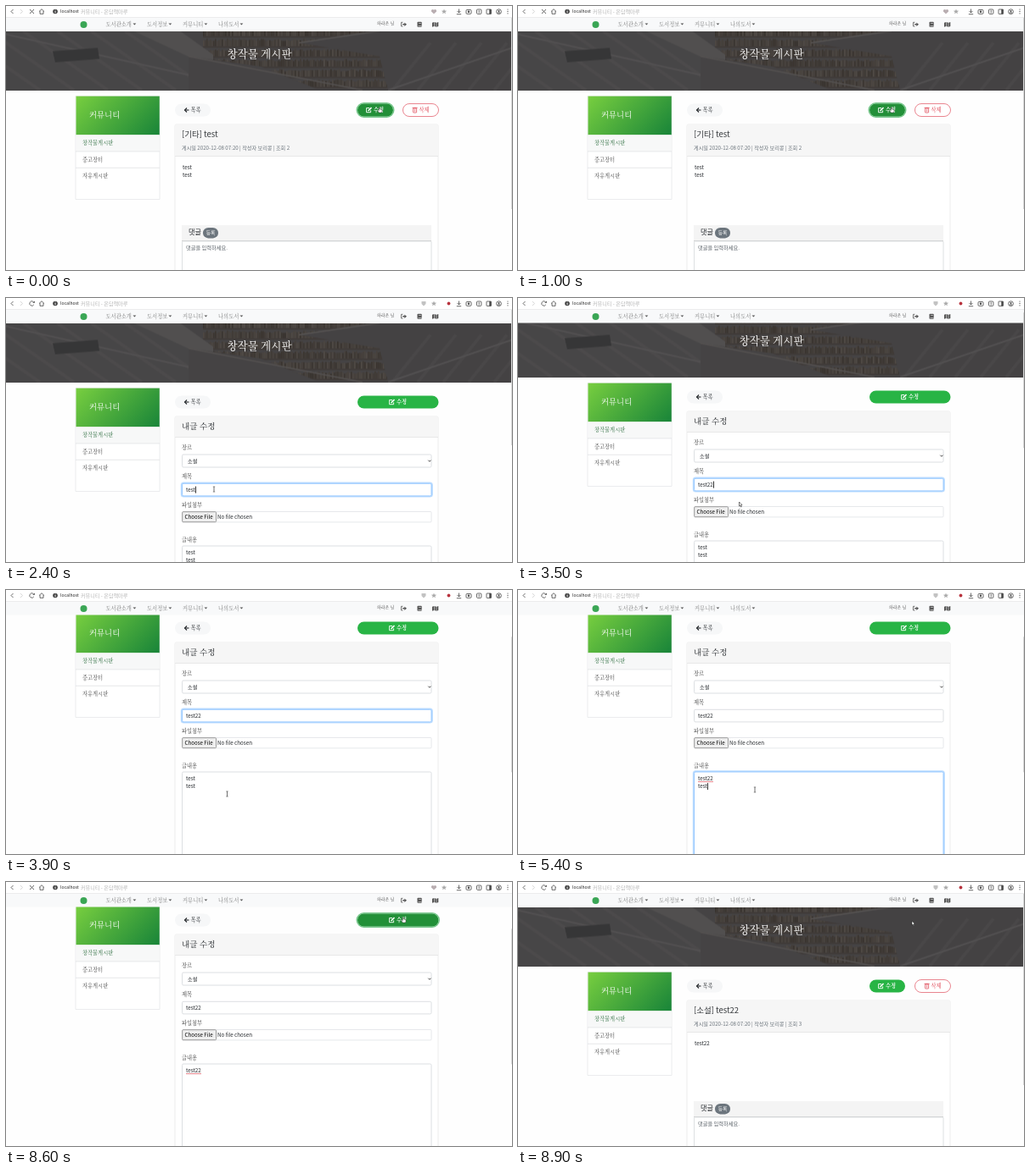
An HTML page with a canvas for the animation above (9000 ms loop, 596x312 px).

```html
<!DOCTYPE html>
<html lang="ko">
<head>
<meta charset="utf-8">
<title>게시판</title>
<style>
html, body { margin: 0; width: 100%; height: 100%; overflow: hidden; background: #fff; }
canvas { display: block; width: 596px; height: 312px; }
</style>
</head>
<body>
<canvas id="stage" width="596" height="312"></canvas>
<script>
const W = 596, H = 312, LOOP = 9000;
const SERIF = '"Noto Serif CJK KR", "Noto Serif KR", "Noto Sans CJK KR", serif';
const SANS = '"Noto Sans CJK KR", "Noto Sans CJK JP", "Noto Sans CJK", sans-serif';
const INK = '#212529', MUTED = '#6c757d', GREEN = '#28b445', DARK_GREEN = '#229038', RED = '#dc3545';
const EDIT_AT = 1100, CLICK_AT = 7500, DONE_AT = 8700;

const stage = document.getElementById('stage').getContext('2d');
let c = stage;

// y is the visual middle of the glyphs
function text(s, x, y, size, color = INK, font = SANS, weight = 400, align = 'left') {
  c.font = `${weight} ${size}px ${font}`;
  c.textAlign = align;
  c.fillStyle = color;
  c.fillText(s, x, y + size * 0.37);
}

function rect(x, y, w, h, color) {
  c.fillStyle = color;
  c.fillRect(x, y, w, h);
}

function box(x, y, w, h, r, fill, stroke, lw = 1) {
  c.beginPath();
  c.roundRect(x, y, w, h, r);
  if (fill) { c.fillStyle = fill; c.fill(); }
  if (stroke) { c.strokeStyle = stroke; c.lineWidth = lw; c.stroke(); }
}

function trace(points) {
  c.beginPath();
  for (let i = 0; i < points.length; i += 2) c.lineTo(points[i], points[i + 1]);
}

function line(points, color, lw = 0.8) {
  trace(points);
  c.strokeStyle = color;
  c.lineWidth = lw;
  c.stroke();
}

function poly(points, color) {
  trace(points);
  c.closePath();
  c.fillStyle = color;
  c.fill();
}

function disc(x, y, r, color) {
  c.beginPath();
  c.arc(x, y, r, 0, 7);
  c.fillStyle = color;
  c.fill();
}

function arc(x, y, r, from, to, color, lw = 0.8) {
  c.beginPath();
  c.arc(x, y, r, from, to);
  c.strokeStyle = color;
  c.lineWidth = lw;
  c.stroke();
}

function at(x, y, draw) {
  c.save();
  c.translate(x, y);
  draw();
  c.restore();
}

function makeBanner() {
  const cv = document.createElement('canvas');
  cv.width = W;
  cv.height = 70;
  c = cv.getContext('2d');
  let seed = 11;
  const rand = () => (seed = (seed * 16807) % 2147483647) / 2147483647;
  rect(0, 0, W, 70, '#454344');

  // shelves of books
  for (let row = 0; row < 6; row++) {
    const y = row * 12 - 3;
    for (let x = 232; x < 500; x += 2) {
      const v = 48 + rand() * 24, h = 6 + rand() * 3;
      rect(x, y + 9 - h, 1.6, h, `rgb(${v + 8},${v + 2},${v - 4})`);
    }
    rect(232, y + 9, 268, 2, '#403b39');
  }

  // stairs, walls and railings
  poly([0, 0, 205, 0, 240, 25, 240, 70, 0, 70], '#474647');
  for (let i = 0; i < 6; i++) line([i * 40 - 60, 0, i * 40 + 40, 70], '#4c4a4b', 4);
  line([0, 4, 215, 52], '#525051', 2);
  poly([55, 24, 108, 20, 110, 33, 58, 37], '#363637');
  poly([150, 0, 205, 0, 244, 28, 244, 44], '#514f4f');
  poly([215, 30, 300, 42, 370, 70, 215, 70], '#454344');
  line([215, 30, 420, 70], '#545150', 1.5);
  poly([345, 14, 430, 0, W, 0, W, 70, 450, 70, 440, 30], '#444243');
  for (let i = 0; i < 5; i++) line([455 + i * 30, 70, 500 + i * 30, 14], '#494748', 4);
  line([450, 70, W, 20], '#525051', 2);
  line([345, 14, 440, 0], '#575453', 1.5);
  c = stage;
  return cv;
}
const banner = makeBanner();

function toolbar(loading) {
  rect(0, 0, W, 13, '#fff');
  const k = '#444';
  line([8.5, 4, 6, 6.5, 8.5, 9], k);
  line([17, 4, 19.5, 6.5, 17, 9], '#ccc');
  if (loading) {
    line([28, 4, 33, 9], k);
    line([33, 4, 28, 9], k);
  } else {
    arc(30.5, 6.5, 2.7, 0.5, 5.6, k);
    poly([31.3, 5.8, 33.8, 5.8, 33.8, 3.4], k);
  }
  line([39, 6.5, 42, 3.7, 45, 6.5], k);
  line([40, 6, 40, 9.3, 44, 9.3, 44, 6], k);
  disc(58, 6.5, 2.8, '#444');
  rect(57.6, 6, 0.9, 2.2, '#fff');
  rect(57.6, 4.6, 0.9, 0.8, '#fff');
  text('localhost', 64, 6.5, 5.1, '#222');
  text('커뮤니티 - 온담책마루', 88, 6.5, 6.1, '#b4b4b4');

  const g = '#aaa';
  const star = loading ? 516 : 504;
  if (loading) {
    disc(502.6, 5.7, 1.7, '#b9aeb1');
    disc(505.4, 5.7, 1.7, '#b9aeb1');
    poly([501, 6.3, 507, 6.3, 504, 9.6], '#b9aeb1');
  } else {
    poly([489.5, 4, 494.5, 4, 494.5, 7, 492, 9.6, 489.5, 7], '#c2c2c2');
    disc(521.5, 6.5, 1.9, '#b8343f');
  }
  const points = [];
  for (let i = 0; i < 10; i++) {
    const r = i % 2 ? 1.4 : 3.3, a = i * Math.PI / 5 - Math.PI / 2;
    points.push(star + r * Math.cos(a), 6.7 + r * Math.sin(a));
  }
  poly(points, g);

  line([533.5, 3.5, 533.5, 8], k);
  line([531.5, 6, 533.5, 8, 535.5, 6], k);
  line([530.8, 9.7, 536.2, 9.7], k);
  box(542, 4.5, 6, 4.8, 1, null, k, 0.8);
  disc(545, 6.8, 1.2, k);
  box(554.5, 4, 5.4, 5.4, 1, null, k, 0.8);
  line([557.2, 5, 557.2, 8.4], k);
  box(566, 4, 5.6, 5.4, 0.5, null, k, 0.8);
  rect(569.3, 4, 2, 5.4, k);
  arc(580.5, 6.7, 2.9, 0, 7, k);
  disc(580.5, 5.9, 1, k);
  rect(579, 7.5, 3, 1, k);
  for (let y = 4; y < 10; y += 2.4) disc(591, y, 0.6, k);
}

function navbar() {
  rect(0, 13, W, 16.5, '#f8f9fa');
  rect(0, 13, W, 0.6, '#e5e5e5');
  disc(91.5, 22, 4, '#3aa655');
  const menu = [['도서관소개', 117.5, 149.5], ['도서정보', 166, 191.5], ['커뮤니티', 208, 233.5], ['나의도서', 250, 275.5]];
  for (const [s, x, tip] of menu) {
    text(s, x, 21.2, 6.3, '#7c7d7d', SERIF);
    poly([tip, 20.4, tip + 3.8, 20.4, tip + 1.9, 22.4], '#555');
  }
  text('하라온 님', 437, 20.2, 4.9, '#444', SERIF);

  const k = '#555';
  line([467.5, 19.3, 465.5, 19.3, 465.5, 24, 467.5, 24], k);
  line([467, 21.7, 470, 21.7], k, 1.3);
  poly([469.3, 19.4, 472, 21.7, 469.3, 24], k);
  box(484.5, 18.8, 5.2, 6, 0.8, k);
  rect(486, 20, 3, 0.6, '#ddd');
  rect(485.5, 23.3, 4.2, 0.6, '#ddd');
  poly([502, 19.8, 504.2, 19, 504.2, 24, 502, 24.7], k);
  poly([504.7, 19, 506.7, 19.8, 506.7, 24.7, 504.7, 24], k);
  poly([507.2, 19.8, 509.3, 19, 509.3, 24, 507.2, 24.7], k);
}

function sidebar() {
  box(82, 106.5, 99, 122, 0, '#fff', '#e6e8ea', 0.8);
  const g = c.createLinearGradient(95, 96, 165, 163);
  g.addColorStop(0, '#76cd3f');
  g.addColorStop(1, '#1c8739');
  rect(82.5, 106.6, 98.3, 45.7, g);
  text('커뮤니티', 98, 128.5, 9.4, '#fff', SERIF, 500);
  rect(82.5, 152.5, 98, 19, '#f7f8f8');
  text('창작물게시판', 90, 162, 6.25, '#2a6b3c', SERIF, 500);
  text('중고장터', 90, 181.5, 6.25, '#444', SERIF);
  text('자유게시판', 90, 200.5, 6.25, '#444', SERIF);
  rect(82, 171.5, 99, 0.8, '#dfe1e3');
  rect(82, 190.8, 99, 0.8, '#dfe1e3');
}

function pencil(x, y) {
  at(x, y, () => {
    line([4, 1.2, 0.6, 1.2, 0.6, 6.4, 5.6, 6.4, 5.6, 4], '#fff', 0.9);
    line([2.6, 4.6, 6.5, 0.7], '#fff', 1.6);
  });
}

function editButton(w, iconX, hover, ring) {
  if (ring) box(413.2, 114.7, w + 1.6, 16.6, 8.3, null, '#74c68a', 1.4);
  box(414, 115.5, w, 15, 7.5, hover ? DARK_GREEN : GREEN);
  pencil(iconX, 119.3);
  text('수정', iconX + 9, 123, 6.25, '#fff', SERIF, 600);
}

function frameTop() {
  c.drawImage(banner, 0, 29.5);
  text('창작물 게시판', 298.5, 56.5, 12.6, '#fff', SERIF, 500, 'center');
  sidebar();
  box(199, 115.5, 42, 15, 7.5, '#f6f7f8');
  line([210.5, 123, 215.5, 123], INK, 1.1);
  line([213, 120.5, 210.5, 123, 213, 125.5], INK, 1.1);
  text('목록', 217.5, 123, 6.25, INK, SERIF, 500);
}

function card(headHeight) {
  box(199, 140, 310, 260, 1.5, '#fff', '#e9e9e9', 0.8);
  rect(199.5, 140.5, 309, headHeight, '#f6f6f6');
  rect(199, 140 + headHeight, 310, 0.8, '#e4e4e4');
}

function viewPage(title, views, lines, pressed) {
  frameTop();
  editButton(42, 424, pressed, pressed);
  box(467.5, 115.5, 42, 15, 7.5, '#fff', RED, 0.6);
  box(479.6, 121, 4, 5, 0.5, null, RED, 0.7);
  line([478.6, 120.3, 484.6, 120.3], RED);
  line([481.6, 122, 481.6, 125], RED, 0.6);
  text('삭제', 486.5, 123, 6.25, RED, SERIF, 500);
  card(37);
  text(title, 207, 151.5, 9.5, '#3a3d40');
  text(`게시일 2020-12-08 07:20 | 작성자 보리콩 | 조회 ${views}`, 207, 167.5, 6.16, MUTED);
  lines.forEach((s, i) => text(s, 208, 190.5 + i * 9.4, 6.24));
  rect(207, 259, 294, 18, '#f4f4f4');
  rect(207, 277, 294, 0.9, '#cfcfcf');
  text('댓글', 215, 267.5, 8.1);
  box(232, 262, 18, 12.4, 6.2, MUTED);
  text('등록', 241, 268.3, 5.8, '#fff', SANS, 400, 'center');
  box(207.5, 278, 293.5, 80, 1, null, '#d5d8db', 0.8);
  text('댓글을 입력하세요.', 212, 285.5, 6.23, '#596067');
}

function field(y, h, focused) {
  if (focused) box(206.7, y - 0.7, 295.2, h + 1.4, 2.5, null, '#bfdeff', 2);
  box(207.5, y, 293.5, h, 1.5, '#fff', focused ? '#80bdff' : '#d3d7db', 0.8);
}

function caretAfter(s, y) {
  c.font = `400 6.24px ${SANS}`;
  rect(212.3 + c.measureText(s).width, y - 4, 0.8, 8, '#000');
}

// number of listed moments already passed
const count = (t, times) => times.filter(m => t >= m).length;

function formState(t) {
  const s = { title: 'test' + '22'.slice(0, count(t, [2700, 3000])), focus: '', last: 0 };
  const first = 'test' + '22'.slice(0, count(t, [4700, 4900]));
  const gone = count(t, [5500, 5600, 5700, 5800, 5900]);
  s.lines = gone > 4 ? [first] : [first, 'test'.slice(0, 4 - gone)];
  s.row = t >= 5200 && gone < 5 ? 1 : 0;
  s.spell = (t >= 5200 && gone < 5) || t >= CLICK_AT;
  if (t >= 2300 && t < 4300) s.focus = 'title';
  if (t >= 4300 && t < CLICK_AT) s.focus = 'body';
  for (const m of [2300, 2700, 3000, 4300, 4700, 4900, 5200, 5500, 5600, 5700, 5800, 5900]) if (t >= m) s.last = m;
  s.caret = s.focus && (t - s.last) % 1060 < 530;
  return s;
}

function editPage(t) {
  const s = formState(t);
  frameTop();
  editButton(95.5, 451, t >= 7300, t >= CLICK_AT);
  card(24);
  text('내글 수정', 207, 151.5, 9.6, INK, SERIF);
  const labels = [['장르', 177], ['제목', 211], ['파일첨부', 245], ['글내용', 285.5]];
  for (const [label, y] of labels) text(label, 207, y, 6.25, '#333', SERIF);

  field(185, 15);
  text('소설', 214, 192.5, 6.2);
  line([497.3, 191.7, 498.9, 193.3, 500.5, 191.7], '#333', 0.9);

  field(219.3, 14.6, s.focus === 'title');
  text(s.title, 212, 226.6, 6.24);
  if (s.caret && s.focus === 'title') caretAfter(s.title, 226.6);

  box(207.5, 252.5, 293.5, 12.4, 1, '#fff', '#e0e3e6', 0.8);
  box(207.7, 252.7, 39.8, 12, 1, '#efefef', '#858585', 0.8);
  text('Choose File', 210.6, 258.7, 6.15, '#000');
  text('No file chosen', 249, 258.7, 6.24);

  field(293, 150, s.focus === 'body');
  s.lines.forEach((l, i) => text(l, 212, 300.7 + i * 9.4, 6.24));
  if (s.spell) rect(212, 304.3, 18, 0.8, '#e0606a');
  if (s.caret && s.focus === 'body') caretAfter(s.lines[s.row], 300.7 + s.row * 9.4);
}

// time, x, y, shape shown from that time on
const PATH = [
  [0, 440, 120, 'hand'], [1500, 440, 120, 'arrow'], [2100, 245, 226, 'beam'],
  [3100, 245, 226, 'arrow'], [3400, 260.5, 241, 'arrow'], [3900, 260.5, 241, 'beam'],
  [4200, 236, 223, 'beam'], [4400, 236, 223, 'beam'], [4700, 279, 236, 'beam'],
  [6100, 279, 236, 'beam'], [6500, 335, 120, 'arrow'], [6800, 351.5, 76, 'arrow'],
  [7000, 385, 66, 'arrow'], [7300, 468, 42, 'hand'], [DONE_AT, 468, 42, 'arrow'],
  [8800, 464, 46, 'arrow'], [LOOP, 464, 46, 'arrow']
];

function pointer(t) {
  const i = PATH.findIndex(p => p[0] > t);
  const a = PATH[i - 1], b = PATH[i];
  const k = (t - a[0]) / (b[0] - a[0]), e = k * k * (3 - 2 * k);
  at(a[1] + (b[1] - a[1]) * e, a[2] + (b[2] - a[2]) * e, () => {
    if (a[3] === 'arrow') {
      const tip = [0, 0, 0, 5, 1.1, 4, 2, 6, 2.8, 5.6, 2, 3.7, 3.5, 3.6, 0, 0];
      poly(tip, '#fff');
      line(tip, '#222', 0.6);
    } else if (a[3] === 'beam') {
      line([0, -2.8, 0, 2.8], '#333', 0.7);
      line([-1.2, -3, 1.2, -3], '#333', 0.6);
      line([-1.2, 3, 1.2, 3], '#333', 0.6);
    } else {
      const hand = [-0.7, 0, 0.5, 0, 0.5, 2, 3, 2.6, 3, 4.5, 2.2, 6, -0.8, 6, -2.3, 3.7, -1.6, 3, -0.7, 3.6, -0.7, 0];
      poly(hand, '#fff');
      line(hand, '#333', 0.5);
    }
  });
}

function scrollAt(t) {
  const k = Math.min(1, Math.max(0, (t - 3400) / 500));
  return Math.round(78 * (k < 0.5 ? 2 * k * k : 1 - 2 * (1 - k) ** 2));
}

function draw(t) {
  const editing = t >= EDIT_AT && t < DONE_AT;
  const scroll = editing ? scrollAt(t) : 0;
  const loading = t < EDIT_AT || (t >= 7600 && t < DONE_AT);
  rect(0, 0, W, H, '#fefefe');
  at(0, -scroll, () => {
    if (editing) editPage(t);
    else if (t < EDIT_AT) viewPage('[기타] test', 2, ['test', 'test'], true);
    else viewPage('[소설] test22', 3, ['test22'], false);
  });
  navbar();
  toolbar(loading);
  rect(595, 14 + scroll * 0.53, 1, editing ? 160 : 226, '#d8d8d8');
  pointer(t);
}

const start = performance.now();
function tick() {
  const t = (performance.now() - start) % LOOP;
  draw(Math.floor(t / 100) * 100);
  requestAnimationFrame(tick);
}
tick();
</script>
</body>
</html>
```
